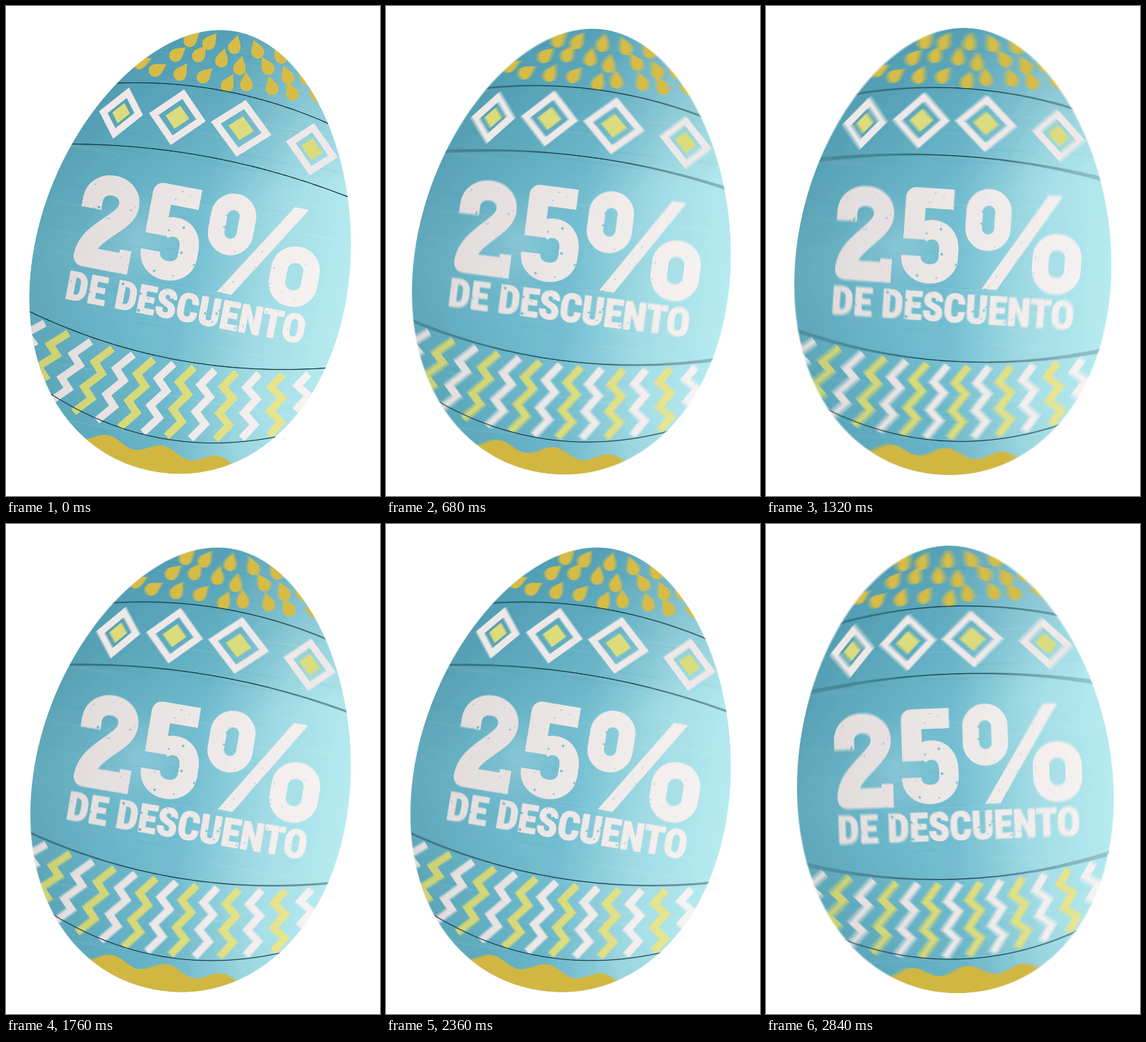
Write an HTML page with a canvas that moves like this. It is 520 px wide and 680 px high and loops after 2.88 s.

```html
<!DOCTYPE html>
<html lang="es">
<head>
<meta charset="utf-8">
<title>25% de descuento</title>
<style>
  html, body { margin: 0; width: 100%; height: 100%; overflow: hidden; background: #fff; }
  canvas { display: block; width: 520px; height: 680px; }
</style>
</head>
<body>
<canvas id="stage" width="520" height="680" aria-label="25% DE DESCUENTO"></canvas>
<script>
const LOOP = 2880, STEP = 40, SWING = 602, TILT = 10.8 * Math.PI / 180, SHUTTER = 17;
const PIVOT = [262, 340], SIZE = 860, SCALE = 2;
const GOLD = '#d4bb45', LINE = '#17363f';
const EGG = new Path2D('M0-310C115-310 220-138 220 33C220 200 125 311 0 311C-125 311-220 200-220 33C-220-138-115-310 0-310Z');

let seed = 7;
const random = () => (seed = seed * 16807 % 2147483647) / 2147483647;
const jitter = range => (random() - .5) * range;

// A square canvas whose origin is the egg's pivot
function makeLayer(draw) {
  const canvas = document.createElement('canvas');
  canvas.width = canvas.height = SIZE * SCALE;
  const c = canvas.getContext('2d');
  c.scale(SCALE, SCALE);
  c.translate(SIZE / 2, SIZE / 2);
  draw(c);
  return canvas;
}

function stamp(c, layer) {
  c.drawImage(layer, -SIZE / 2, -SIZE / 2, SIZE, SIZE);
}

function shade(gradient, ...colors) {
  colors.forEach((color, i) => gradient.addColorStop(i / (colors.length - 1), color));
  return gradient;
}

const across = (c, ...colors) => shade(c.createLinearGradient(-218, 0, 218, 0), ...colors);
const white = c => across(c, '#ddd7d7', '#ebe6e5', '#f6f2f1');
const pale = c => across(c, '#c9cd72', '#d9da78', '#ece695');

function flood(c, style) {
  c.fillStyle = style;
  c.fillRect(-SIZE / 2, -SIZE / 2, SIZE, SIZE);
}

function strokePath(c, path, style, width) {
  c.strokeStyle = style;
  c.lineWidth = width;
  c.stroke(new Path2D(path));
}

// Height of a printed band: highest or lowest on the axis, bending towards the edges
const bow = (x, middle, bend) => middle + bend * (x / 200) ** 2;
const ABOVE_ZIGZAGS = [153, -25], BELOW_ZIGZAGS = [264, -50];

function drawShell(c) {
  flood(c, across(c, '#61a9ba', '#69b4c7', '#72bdcf', '#a0dae3', '#b4e9ee'));
  const shadow = 'rgba(35,112,140,', clear = shadow + '0)';
  flood(c, shade(c.createLinearGradient(-90, -300, 10, -60), shadow + '.42)', shadow + '.22)', clear));
  flood(c, shade(c.createLinearGradient(-110, 300, -30, 130), shadow + '.22)', clear));
  flood(c, shade(c.createRadialGradient(-80, 0, 0, -80, 0, 75), 'rgba(255,255,255,.18)', 'rgba(255,255,255,0)'));
  for (let i = 0; i < 60; i++) {
    const w = 40 + random() * 90;
    strokePath(c, `M${jitter(400) - 30} ${jitter(560)}q${w / 2} ${jitter(8)} ${w} 0`,
      i % 2 ? 'rgba(255,255,255,.06)' : 'rgba(30,100,125,.05)', 1 + random() * 2);
  }
}

function drawDrops(c) {
  const drop = new Path2D('M0-13C3-6 8-2 8 4A8 8 0 0 1-8 4C-8-2-3-6 0-13Z');
  c.fillStyle = GOLD;
  for (let row = 0; row < 3; row++) {
    for (let col = -4; col <= 4; col++) {
      const x = (col + row % 2 / 2) * 31 + jitter(9);
      c.save();
      c.translate(x, -242 - row * 25 + jitter(9));
      c.rotate(-x * .008 + jitter(.8));
      c.scale(1.1, 1.1);
      c.fill(drop);
      c.restore();
    }
  }
}

function drawDiamonds(c) {
  for (let i = 0; i < 4; i++) {
    const x = -136 + 72 * i + 6 * i * i, lean = x * .001;
    const w = 43 - (x - 25) ** 2 / 1850, h = 40 - (x / 62) ** 2;
    const diamond = k => `M${-lean * h * k} ${-h * k}L${w * k} ${lean * w * k}L${lean * h * k} ${h * k}L${-w * k} ${-lean * w * k}Z`;
    c.save();
    c.translate(x, bow(x, -180, 24));
    strokePath(c, diamond(.84), '#ece7e6', 9.5);
    c.fillStyle = '#dbdb7a';
    c.fill(new Path2D(diamond(.42)));
    c.restore();
  }
}

function drawZigzags(c) {
  for (let i = -6; i <= 6; i++) {
    const x = 28.7 * i + .07 * i ** 3 - 1, lean = x * .0015 - .08;
    const top = bow(x, ...ABOVE_ZIGZAGS) + 8;
    const height = bow(x, ...BELOW_ZIGZAGS) - 6 - top;
    let path = '';
    for (let k = 0; k < 6; k++) {
      const down = (k / 5 + (k % 2 ? .03 : -.02)) * height;
      path += `${k ? 'L' : 'M'}${x + (k % 2 ? -14 : 2) + lean * down} ${top + down}`;
    }
    strokePath(c, path, i % 2 ? pale(c) : white(c), 10.5);
  }
}

function drawBands(c) {
  const band = (middle, bend) =>
    strokePath(c, `M-220 ${bow(220, middle, bend)}Q0 ${2 * middle - bow(220, middle, bend)} 220 ${bow(220, middle, bend)}`, LINE, 1.2);
  band(-226, 31);
  band(-132, 19);
  band(...ABOVE_ZIGZAGS);
  band(...BELOW_ZIGZAGS);
}

function drawGlaze(c) {
  c.fillStyle = '#cfb640';
  c.beginPath();
  c.moveTo(-130, 330);
  for (let x = -130; x <= 130; x += 2) c.lineTo(x, 280 - 6.5 * Math.cos((x + 70) / 12.4));
  c.lineTo(130, 330);
  c.fill();
}

function drawOffer(c) {
  const ink = white(c);
  c.lineJoin = 'round';
  // Slab numerals
  strokePath(c, 'M-152-32V-44C-152-76-101-76-101-44C-101-18-150-2-150 36H-86', ink, 28);
  strokePath(c, 'M-94 17V49', ink, 16);
  strokePath(c, 'M-5-71H-58V-13', ink, 28);
  strokePath(c, 'M-50-19C-38-34-8-30-8 0V10C-8 42-60 42-60 10', ink, 27);
  c.lineWidth = 23;
  c.beginPath();
  c.roundRect(24.5, -77.5, 40, 63, 20);
  c.roundRect(120.5, -21.5, 45, 61, 22);
  c.stroke();
  c.fillStyle = ink;
  c.fill(new Path2D('M126-86H146L62 50H41Z'));

  const setFont = size => c.font = `900 condensed ${size}px "Roboto Condensed", Roboto, "Open Sans", sans-serif`;
  const text = 'DE DESCUENTO', room = 338;
  setFont(56);
  setFont(56 * Math.min(1, room / c.measureText(text).width));
  c.textAlign = 'center';
  c.lineWidth = 2;
  c.fillText(text, 3, 98);
  c.strokeText(text, 3, 98);

  // Worn print
  c.globalCompositeOperation = 'destination-out';
  for (let i = 0; i < 210; i++) {
    c.beginPath();
    c.arc(jitter(345) + 4, jitter(180) + 8, .4 + random() ** 3 * 1.6, 0, 7);
    c.fill();
  }
}

const offer = makeLayer(drawOffer);
const egg = makeLayer(c => {
  flood(c, '#fff');
  c.clip(EGG);
  [drawShell, drawDrops, drawDiamonds, drawZigzags, drawBands, drawGlaze].forEach(draw => draw(c));
  stamp(c, offer);
});

const ctx = document.getElementById('stage').getContext('2d');
const angleAt = t => TILT * Math.cos(2 * Math.PI * t / SWING);

// Motion blur: running average of poses while the shutter is open
function render(now) {
  const t = Math.floor(now % LOOP / STEP) * STEP, samples = 9;
  for (let i = 0; i < samples; i++) {
    ctx.setTransform(1, 0, 0, 1, ...PIVOT);
    ctx.rotate(angleAt(t + (i / (samples - 1) - .5) * SHUTTER));
    ctx.globalAlpha = 1 / (i + 1);
    stamp(ctx, egg);
  }
}

const start = performance.now();
function tick() {
  render(performance.now() - start);
  requestAnimationFrame(tick);
}
tick();
</script>
</body>
</html>
```
